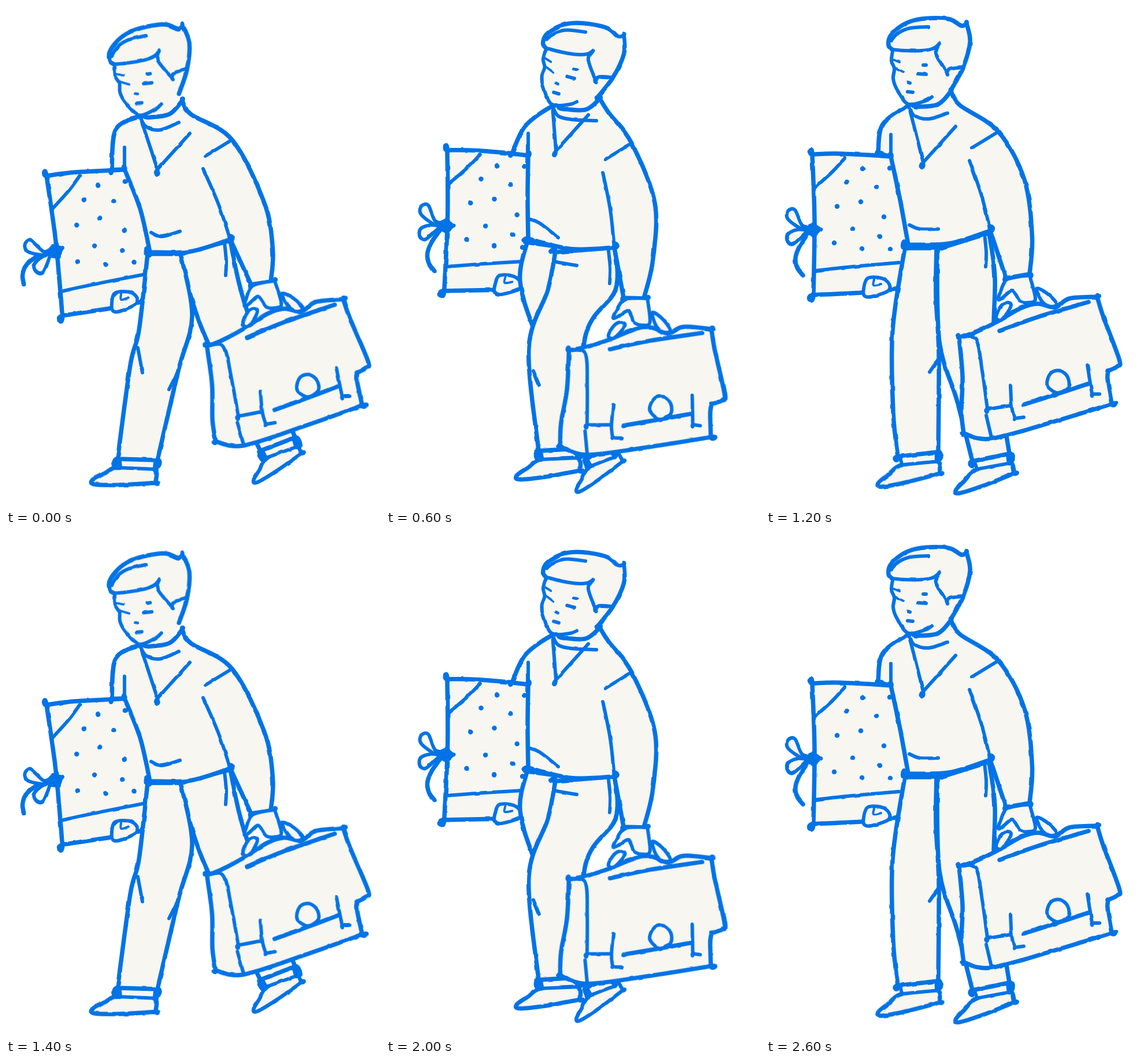
An HTML page for the animation above (2800 ms loop, 647 by 865 pixels).

```html
<!DOCTYPE html>
<html lang="en">
<head>
<meta charset="utf-8">
<title>Walking boy</title>
<style>
  html, body { margin: 0; width: 100%; height: 100%; overflow: hidden; background: #fff; }
  #strip { display: flex; width: 4529px; height: 865px; animation: walk 1.4s steps(7) infinite; }
  #strip svg { flex: none; width: 647px; height: 865px; overflow: hidden; }
  @keyframes walk { to { transform: translateX(-4529px); } }
  path { stroke: #0073e6; stroke-width: 6; stroke-linecap: round; stroke-linejoin: round; fill: none; }
  .shape { fill: #f7f6f0; stroke-width: 7.5; }
  .part { fill: #f7f6f0; }
  .skin { fill: #f7f6f0; stroke: none; }
  .blot { fill: #0073e6; }
  .bold { stroke-width: 7.5; }
  .thin { stroke-width: 4; }
  .dot { stroke-width: 8.5; }
</style>
</head>
<body>
<div id="strip"></div>
<svg width="0" height="0" style="position:absolute">
  <filter id="ink" x="0" y="0" width="647" height="865" filterUnits="userSpaceOnUse" color-interpolation-filters="sRGB">
    <feTurbulence type="fractalNoise" baseFrequency=".06" numOctaves="1" seed="4"/>
    <feDisplacementMap in="SourceGraphic" scale="3" xChannelSelector="R" yChannelSelector="G"/>
  </filter>
</svg>
<script>
const add = (p, dx, dy) => [p[0] + dx, p[1] + dy];
const lerp = (p, q, t) => p.map((v, i) => v + (q[i] - v) * t);
const corner = p => [p[0], p[1], 1];

// "x,y" points; "!" marks a sharp corner.
const parse = text => text.split(" ").map(s => {
  const p = s.replace("!", "").split(",").map(Number);
  return s.endsWith("!") ? corner(p) : p;
});

// Catmull-Rom curve; a doubled point makes a corner.
function curve(points, closed) {
  const pts = points.flatMap(([x, y, sharp]) => sharp ? [[x, y], [x, y]] : [[x, y]]);
  const n = pts.length;
  const at = i => closed ? pts[(i + n) % n] : pts[Math.max(0, Math.min(n - 1, i))];
  let d = "M" + pts[0];
  for (let i = 0; i < (closed ? n : n - 1); i++) {
    const [a, b, c, e] = [at(i - 1), at(i), at(i + 1), at(i + 2)];
    d += "C" + [b.map((v, k) => v + (c[k] - a[k]) / 6), c.map((v, k) => v - (e[k] - b[k]) / 6), c];
  }
  return d + (closed ? "Z" : "");
}

const path = (pts, cls, closed) => `<path class="${cls}" d="${curve(pts, closed)}"/>`;
const draw = (text, cls, closed) => text.split("/").map(s => path(parse(s), cls, closed)).join("");
const shape = (text, cls = "shape") => draw(text, cls, true);
const line = (text, cls = "") => draw(text, cls, false);
const turn = (deg, [x, y], body) => `<g transform="rotate(${deg} ${x} ${y})">${body}</g>`;

// Moves a part so that its pivot lands on a joint, then turns it.
const hang = (body, pivot, joint, deg) =>
  `<g transform="translate(${joint}) rotate(${deg}) translate(${-pivot[0]} ${-pivot[1]})">${body}</g>`;

const head =
  shape("212,68 222,46 250,27 285,21 346,31 352,60 341,107 320,146 290,182 262,178 243,168 226,145 218,80", "skin") +
  line("218,75 212,68 215,52 233,35 255,25 285,21 318,23 338,34 347,30! 353,62 341,106 320,145", "bold") +
  line("218,75 240,77 270,77 290,73 299,66! 294,82 313,116! 318,108 341,105/217,60 230,46 250,38 281,36") +
  line("219,78 217,95 222,108 220,125 226,143 245,169 275,164 287,157") +
  line("221,93 231,97/224,107 238,114", "thin") +
  line("272,102 277,102/246,132 249,133/263,117 277,118/245,148 254,149");

const bag =
  shape("334,573! 365,562 400,545 440,522 470,514 500,520 525,505 573,502! 583,535 611,610 608,622 592,630! 591,645 598,687! 500,717 390,747 342,738! 338,700 340,640") +
  line("337,572 363,575 374,630 383,696! 424,690/381,707 390,745/423,655 425,692 430,712! 446,710/556,620 564,670! 577,670") +
  line("404,561 470,537 558,511/446,688 500,671 558,652", "bold") +
  shape("488,658 487,645 495,632 510,630 522,641 523,658 505,668", "part") +
  shape("398,538 405,520 416,512 424,516 416,532 406,542/468,488 486,496 502,512 500,518 488,518 476,508", "part") +
  shape("418,472 405,495 402,507 410,503 425,491 432,498 440,510 455,512 466,505 456,465!", "part");

const knot = [84, 386];
const spots = "167,281 140,304 191,312 123,346 164,338 204,364 150,385 118,409 166,419 197,398 215,420 214,280";
const box =
  shape("80,256! 130,255 222,260! 247,400 230,488! 180,494 82,499! 84,370") +
  line("137,262 115,286 85,313/85,457 150,450 230,443") +
  spots.split(" ").map(p => line(p + " " + p, "dot")).join("") +
  shape("176,470 200,470 213,480 211,492 182,502 170,500 169,488", "part") +
  line("187,472 186,482 199,480", "thin");
const loops =
  shape("75,382 62,378 50,352 38,354 38,368 62,385/72,388 55,386 38,393 37,406 47,411 68,392", "part") +
  shape("72,382 82,377! 94,386! 83,397! 72,391", "blot");
const tail = line("72,394 58,415 51,435 54,452 64,465", "bold");
const shoe = shape("-32,14 -57,27 -77,39 -72,46 -27,45 33,39! 28,14");

// The 2nd and 3rd corners of a leg are its ankles; cuff and shoe follow their slope.
function leg(text) {
  const pts = parse(text);
  const [, a, b] = pts.filter(p => p[2]);
  const slope = Math.atan2(b[1] - a[1], b[0] - a[0]);
  const below = (t, drop) => corner(add(lerp(a, b, t), -drop * Math.sin(slope), drop * Math.cos(slope)));
  const [x, y] = below(.5, 0);
  const tilt = slope * 1.4;
  const foot = `<g transform="translate(${x} ${y}) rotate(${tilt * 180 / Math.PI}) scale(${Math.cos(tilt)})">${shoe}</g>`;
  const cuff = path([below(.05, 0), below(.08, 15), below(.93, 16), below(.95, 0)], "part", true);
  return foot + cuff + path(pts, "shape", true);
}

function sweater([neck, arm, armEnd, pit, side, hipL, hipR, cuffL, cuffR, elbow, shoulder, nape, vee], fold) {
  const sleeve = add(shoulder, -50, 50);
  const seams = [
    [add(pit, 0, -38), pit],
    [sleeve, add(lerp(sleeve, hipR, .5), 3, 0), hipR],
    [shoulder, add(shoulder, -46, 28)],
    [lerp(neck, vee, .1), corner(vee), add(vee, 56, -62)],
    [neck, add(neck, 10, 17), add(neck, 34, 23), add(nape, -6, 38)],
    [add(hipR, -10, 6), add(hipR, -7, 37), add(hipR, -8, 62)]
  ];
  if (fold) seams.push([add(hipL, 2, -34), add(hipL, 20, -27), add(hipL, 52, fold)]);
  return path([
    neck, arm, corner(armEnd), corner(pit), side, corner(hipL),
    add(lerp(hipL, hipR, .5), 0, 10), corner(hipR), corner(cuffL), corner(cuffR),
    add(lerp(cuffR, elbow, .4), 8, 0), elbow, shoulder, add(nape, 15, 24), corner(nape),
    add(lerp(nape, neck, .3), 0, 15), add(lerp(nape, neck, .8), 0, 7)
  ], "shape", true) + seams.map(s => path(s, "")).join("");
}

// Joints from neck to v-neck in the order sweater() takes them, then the box corner.
// Turns: head, bag, box.
const pose = (turns, joints, legs, rest) => ({ turns, joints: parse(joints), legs, ...rest });

const stride = pose([-10, -2.5, -6],
  "232,191 190,213 183,283 205,282 232,350 249,425 388,403 424,481 458,476 447,340 391,231 305,163 262,282 72,292",
  ["300,428! 340,560 440,768! 500,745! 415,520 388,405!",
   "245,428! 230,560 215,620 193,782! 262,784! 298,630 322,535 302,428!"],
  { fold: -36, bow: -18, crease: "298,630 282,662/228,590 236,633" });

const lift = pose([-1, 1, -1.2],
  "242,183 206,213 190,278 221,282 228,360 240,422 384,406 413,470 444,468 442,320 388,215 318,156 264,260 82,282",
  ["289,428! 328,567 455,742! 518,717! 400,540 384,406!",
   "240,424! 233,560 240,780! 310,780! 325,570 296,490 289,428!"],
  { crease: "323,590 300,655" });

const pass = pose([10, 8, 1.7],
  "288,173 241,207 218,255 246,258 245,330 246,402 395,417 411,504 446,505 465,340 425,237 370,160 294,250 108,248",
  ["244,408! 232,475 260,570 345,782! 391,763! 330,560 330,420!",
   "293,425! 280,490 247,590 264,768! 335,764! 345,570 397,490 396,417!"],
  { fold: -2, crease: "255,630 265,655/295,442 330,448" });

const carry = pose([4, 12, 3.3],
  "296,178 254,210 237,268 266,274 269,345 268,417 403,420 410,471 452,476 471,320 443,225 374,156 313,255 127,262",
  ["330,425! 340,560 415,765! 472,733! 390,560 402,422!",
   "270,420! 260,540 285,680 328,783! 403,782! 395,600 402,422!"],
  { crease: "318,428 317,545" });

const settle = pose([0, 0, 0],
  "247,172 202,204 194,252 216,260 232,335 246,412 388,388 415,470 456,463 447,300 402,217 320,147 272,270 82,255",
  ["296,420! 300,580 330,680 357,786! 421,773! 395,600 396,470 386,392!",
   "240,418! 219,560 220,700 228,778! 298,770! 299,600 294,500 295,418!"],
  { fold: -27, crease: "298,610 283,632" });

const between = (a, b, t, legs) => ({
  turns: lerp(a.turns, b.turns, t),
  joints: a.joints.map((p, i) => lerp(p, b.joints[i], t)),
  legs, crease: a.crease
});

const swing = between(lift, pass, .25, [
  "292,425! 330,570 412,765! 470,740! 402,540 386,410!",
  "242,420! 236,560 250,782! 318,781! 328,575 298,490 292,425!"]);
const reach = between(lift, pass, .1, [
  "260,422! 290,560 400,762! 452,738! 390,560 350,420!",
  "241,422! 236,560 228,784! 298,783! 335,600 398,500 384,408!"]);

// Loops and ribbon tail swing opposite ways.
function figure({ turns: [nod, sway, tip], joints, legs, fold, bow = 0, crease }) {
  const ribbon = turn(-2 * bow, knot, tail) + turn(bow, knot, loops);
  return hang(box + ribbon, [82, 255], joints[13], tip) +
    legs.map(leg).join("") +
    hang(head, [247, 172], joints[0], nod) +
    sweater(joints, fold) + line(crease) +
    hang(bag, [415, 470], joints[7], sway);
}

document.getElementById("strip").innerHTML = [stride, lift, swing, pass, reach, carry, settle]
  .map(p => `<svg viewBox="0 0 647 865"><g filter="url(#ink)">${figure(p)}</g></svg>`).join("");
</script>
</body>
</html>
```
